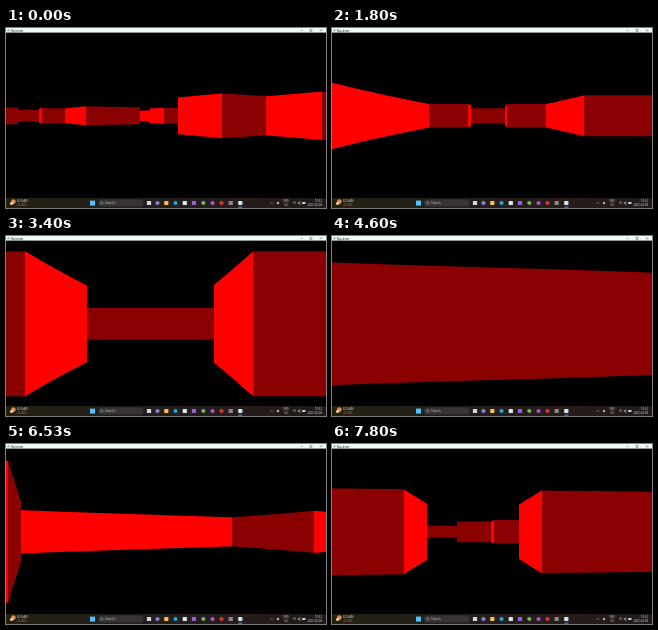
An HTML page for the animation above (8000 ms loop, 320 by 180 pixels).

```html
<!DOCTYPE html>
<html lang="en">
<head>
<meta charset="utf-8">
<title>Raycaster</title>
<style>
  html, body { margin: 0; width: 100%; height: 100%; overflow: hidden; background: #000; }
  svg { display: block; width: 100vw; height: 100vh; }
  text { font-family: "Open Sans", "Noto Sans", sans-serif; }
</style>
</head>
<body>
<svg viewBox="0 0 320 180" preserveAspectRatio="none">
  <defs>
    <clipPath id="view"><rect y="4" width="320" height="166"/></clipPath>
    <linearGradient id="bar">
      <stop offset="0" stop-color="#242010"/>
      <stop offset=".4" stop-color="#221e1d"/>
      <stop offset=".8" stop-color="#271b19"/>
      <stop offset="1" stop-color="#1f1a1c"/>
    </linearGradient>
  </defs>
  <rect width="320" height="180"/>
  <g clip-path="url(#view)">
    <path id="sides" fill="#f00"/>
    <path id="fronts" fill="#8b0000"/>
  </g>

  <g id="titlebar">
    <rect width="320" height="4.6" fill="#f0faf3"/>
    <rect x="1.5" y="1.4" width="2" height="2" fill="#8aa"/>
    <text x="4.8" y="3.5" font-size="2.8" fill="#222">Raycaster</text>
    <path d="M294.5 2.4h2.2M304 1.4h2v2h-2zM314 1.4l2 2m0-2l-2 2" fill="none" stroke="#333" stroke-width=".4"/>
  </g>

  <g id="taskbar">
    <rect y="170" width="320" height="10" fill="url(#bar)"/>
    <circle cx="7.4" cy="173.6" r="2.3" fill="#f08a3c"/>
    <circle cx="5.6" cy="175.4" r="1.6" fill="#e8c8b0"/>
    <text x="11" y="174.4" font-size="2.8" fill="#eee">8:24 AM</text>
    <text x="11" y="178" font-size="2.8" fill="#999">+0.25%</text>
    <rect x="84" y="172.6" width="5" height="5" fill="#4cc2ff"/>
    <rect x="92" y="171.6" width="45.5" height="7" rx="3.5" fill="#383334"/>
    <circle cx="95.6" cy="174.8" r="1" fill="none" stroke="#ccc" stroke-width=".4"/>
    <path d="M96.3 175.5l1 1" stroke="#ccc" stroke-width=".4"/>
    <text x="99" y="176.2" font-size="3.2" fill="#ccc">Search</text>
    <g id="apps"></g>
    <rect x="232.3" y="178.8" width="4" height=".7" rx=".3" fill="#4cc2ff"/>
    <path d="M264.6 175.6l1.2-1.2 1.2 1.2M287 174.5q1.5-1.5 3 0M287.7 175.5q.8-.8 1.6 0M292 174.5h.8l1-1v3l-1-1h-.8z" fill="none" stroke="#ddd" stroke-width=".5"/>
    <circle cx="272" cy="175" r="1.2" fill="#bbb"/>
    <rect x="296" y="174" width="3.5" height="2" rx=".4" fill="#ccc"/>
    <g fill="#ddd" font-size="2.8">
      <text x="280" y="174.4" text-anchor="middle">ENG</text>
      <text x="280" y="178" text-anchor="middle">US</text>
      <text x="316" y="174.4" text-anchor="end">10:52</text>
      <text x="316" y="178" text-anchor="end">2025-02-08</text>
    </g>
  </g>
</svg>
<script>
// Top row is y = 4, left column is x = -2.
const map = [
  "##########",
  "#........#",
  "#.....##.#",
  "#........#",
  "##.##....#",
  "#...#....#",
  "#...#....#",
  "#...##.###",
  "#........#",
  "#........#",
  "#........#",
  "#........#",
  "#....#...#",
  "#...###..#",
  "#....#...#",
  "#........#",
  "#........#",
  "#........#",
  "#........#",
  "##########"
];
const LEFT = -2, TOP = 4;
const WIDTH = 320, MID = 87.8, WALL = 82.5, FOV = 66, FPS = 15, LOOP = 8000;

// time, x, y, heading in degrees clockwise from north
const walk = [
  [400, -0.66, -11.637, 33.7],
  [1100, 0.3, -9.45, 17],
  [1800, 0.61, -7.03, 0],
  [3400, 0.633, -1.138, -0.1],
  [4410, 0.62, 2.55, 0],
  [4525, 0.62, 2.55, 0],
  [5467, 0.62, 2.52, 101],
  [5800, 0.62, 2.52, 101],
  [5867, 0.792, 2.469, 101],
  [6533, 2.62, 1.888, 117.9],
  [7150, 3.78, 1.05, 147],
  [7800, 4.485, -0.028, 183.6]
];

const rad = deg => deg * Math.PI / 180;
const $ = id => document.getElementById(id);

function cameraAt(t) {
  const next = walk.findIndex(k => k[0] > t);
  if (next === 0) return walk[0].slice(1);
  if (next < 0) return walk[walk.length - 1].slice(1);
  const a = walk[next - 1], b = walk[next];
  const p = (t - a[0]) / (b[0] - a[0]);
  return [1, 2, 3].map(i => a[i] + (b[i] - a[i]) * p);
}

function solid(x, y) {
  const row = map[TOP - y];
  return !row || row[x - LEFT] !== ".";
}

// Walks the grid until a wall is met.
function cast(x, y, angle) {
  const dx = Math.sin(angle) || 1e-9, dy = Math.cos(angle) || 1e-9;
  const stepX = Math.sign(dx), stepY = Math.sign(dy);
  const lenX = Math.abs(1 / dx), lenY = Math.abs(1 / dy);
  let cx = Math.floor(x), cy = Math.floor(y);
  let nextX = (dx > 0 ? cx + 1 - x : x - cx) * lenX;
  let nextY = (dy > 0 ? cy + 1 - y : y - cy) * lenY;
  for (;;) {
    const side = nextX < nextY;
    const dist = side ? nextX : nextY;
    if (side) { cx += stepX; nextX += lenX; }
    else { cy += stepY; nextY += lenY; }
    if (solid(cx, cy)) return { dist, side };
  }
}

function draw(t) {
  const [x, y, heading] = cameraAt(t);
  let sides = "", fronts = "";
  for (let col = 0; col < WIDTH; col++) {
    const a = ((col + 0.5) / WIDTH - 0.5) * FOV;
    const { dist, side } = cast(x, y, rad(heading + a));
    const h = Math.min(WALL / (dist * Math.cos(rad(a))), 200);
    const bar = `M${col} ${(MID - h).toFixed(2)}h1v${(2 * h).toFixed(2)}h-1z`;
    if (side) sides += bar; else fronts += bar;
  }
  $("sides").setAttribute("d", sides);
  $("fronts").setAttribute("d", fronts);
}

// Taskbar icons: centre, colour, corner radius
$("apps").innerHTML = [
  [143, "#d8d8d8", 0.5], [151.5, "#8f7fd8", 2.1], [160.3, "#f3c14b", 0.5],
  [169.5, "#2b9fd8", 2.1], [178.8, "#dfe6ea", 0.5], [188, "#9a62d8", 0.5],
  [197.3, "#7fae6a", 2.1], [206.5, "#a05ac8", 2.1], [215.5, "#c8383c", 2.1],
  [224.7, "#888", 0.5], [234.3, "#cfe6ea", 0.5]
].map(([x, fill, r]) =>
  `<rect x="${x - 2.1}" y="172.9" width="4.2" height="4.2" rx="${r}" fill="${fill}"/>`).join("");

const start = performance.now();
let shown = -1;
function tick() {
  const t = (performance.now() - start) % LOOP;
  const step = Math.floor((t + 4) * FPS / 1000) % (LOOP * FPS / 1000);
  if (step !== shown) draw((shown = step) * 1000 / FPS);
  requestAnimationFrame(tick);
}
tick();
</script>
</body>
</html>
```
